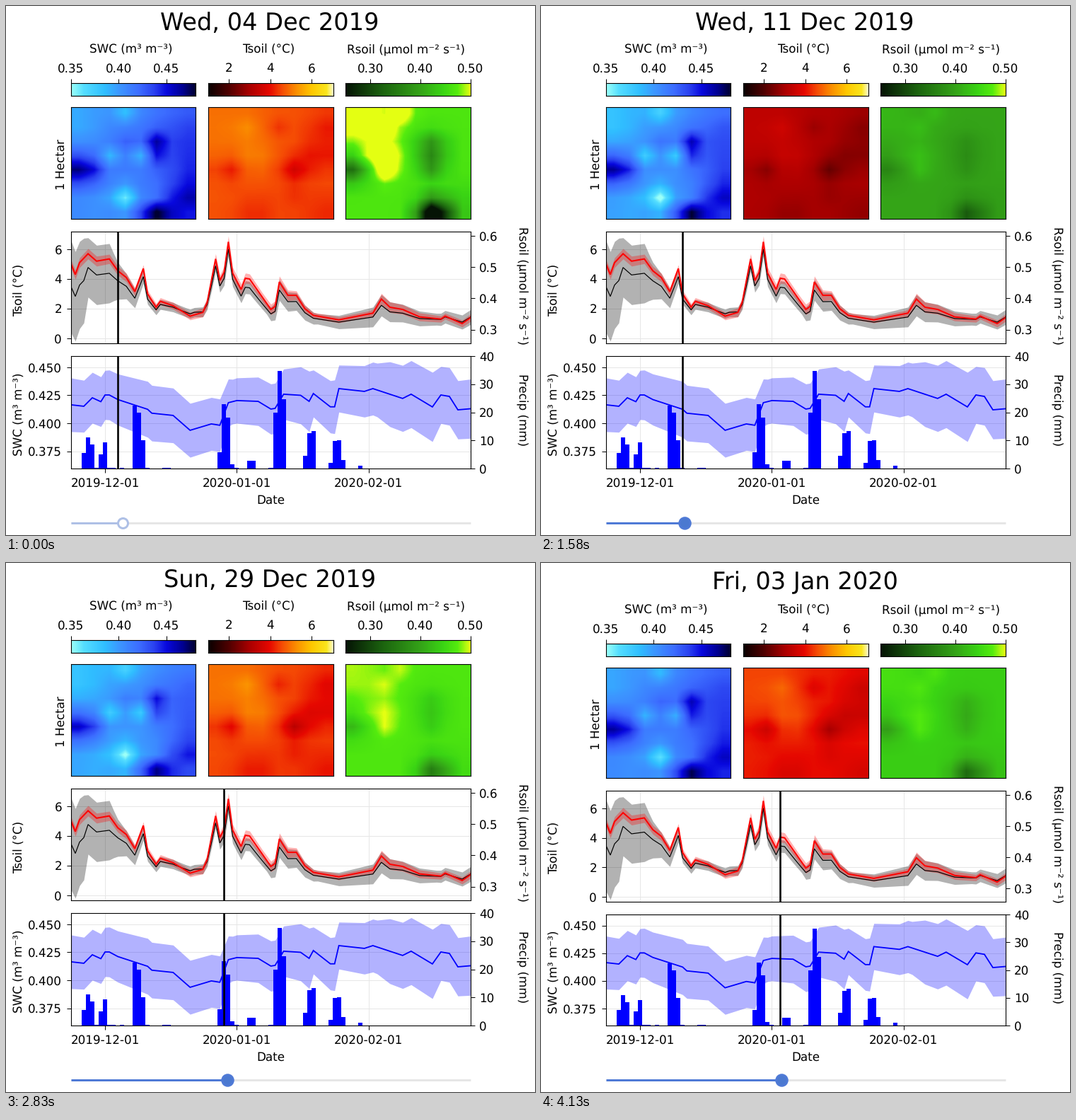
Animation, 748 px wide and 748 px high, one loop 4.18 s. Source, as a matplotlib script:

```python
import numpy as np
import matplotlib.pyplot as plt
from matplotlib.animation import FuncAnimation
from matplotlib.colors import LinearSegmentedColormap

SIZE = 748
PT = 0.72  # points per pixel at 100 dpi
FRAMES, STEP = 95, 44
DAYS = np.arange(95)  # day 0 is Sat, 23 Nov 2019
X0, X1 = 92, 657

plt.rcParams.update({
    "font.family": "DejaVu Sans", "font.size": 16.8 * PT,
    "text.hinting": "none", "axes.linewidth": 1.1 * PT,
})


# ---------------------------------------------------------------- time series
def curve(*points):
    """Daily values through a few (day, value) turning points."""
    return np.interp(DAYS, *zip(*points))


temp = curve((0, 5), (1, 4.3), (2, 5.1), (4, 5.7), (6, 5.2), (9, 5.35),
             (11, 4.55), (13, 4.1), (15, 3.15), (17, 4.7), (18, 3), (20, 2.1),
             (21, 2.5), (24, 2.2), (28, 1.5), (31, 1.75), (32, 2.4),
             (34, 5.35), (35, 3.9), (36, 4.45), (37, 6.5), (38, 4.4),
             (40, 3.3), (41, 4.05), (42, 4), (47, 1.95), (48, 2.15), (49, 3.8),
             (51, 2.9), (53, 2.9), (55, 2), (57, 1.55), (63, 1.25), (71, 1.7),
             (73, 2.65), (75, 2.1), (78, 1.95), (82, 1.45), (87, 1.3),
             (88, 1.5), (92, 1), (94, 1.4))
temp_sd = curve((0, .3), (4, .35), (18, .25), (26, .22), (37, .4), (45, .3),
                (49, .4), (57, .2), (70, .2), (73, .38), (88, .2), (94, .25))

# respiration follows temperature with a slow drift (on the temperature scale)
resp = .3 + .75 * temp + .02 * temp ** 2 + curve(
    (0, -1.08), (3, -1.04), (4, -.45), (9, -.5), (11, -.25), (25, .08),
    (29, .22), (33, 0), (38, 0), (41, -.22), (55, -.15), (73, -.2), (94, .05))
resp_sd = curve((0, 3.1), (3, 2.85), (4, 2), (9, 2), (10, 1.6), (11, 1.25),
                (13, .85), (18, .35), (27, .3), (33, .35), (37, .5), (46, .35),
                (49, .7), (53, .6), (58, .35), (63, .45), (73, .72),
                (86, .4), (94, .5))

water = curve((0, 416.5), (3, 415.2), (5, 422.8), (7, 419.3), (8, 425.3),
              (9, 425.3), (11, 421.2), (18, 412.5), (19, 409), (24, 407),
              (28, 393.7), (33, 399.4), (35, 398.2), (37, 418.4), (39, 420.3),
              (44, 419.6), (47, 412.7), (48, 413.3), (50, 426), (54, 425),
              (56, 419.6), (57, 426.6), (61, 414.7), (62, 414.7), (63, 431),
              (69, 428.5), (71, 431), (78, 422.2), (80, 426), (85, 414.6),
              (87, 425.3), (89, 424), (91, 412), (94, 413)) / 1000
water_sd = curve((0, 24), (8, 22), (18, 25), (35, 23.5), (38, 20), (47, 22.5),
                 (50, 22.5), (56, 27), (57, 21), (62, 24), (63, 21), (72, 24),
                 (75, 29), (85, 31), (87, 25.5), (94, 26.5)) / 1000

rain = np.zeros(len(DAYS))
rain[[6, 9, 10, 12, 18, 22, 23, 39, 47]] = .3
for start, storm in [(3, (5.5, 11, 8.5)), (7, (5, 9.2)), (15, (22.5, 20, 10)),
                     (35, (5.7, 22.8, 18, 1.4)), (42, (2.8, 2.8)),
                     (48, (20, 34.8, 24.6)), (55, (4.5, 12.5, 13.3)),
                     (61, (2, 9.8, 10, 3)), (68, (1,))]:
    rain[start:start + len(storm)] = storm

# ------------------------------------------------------ maps of 8 x 8 plots
ROW, COL = np.mgrid[:8, :8]


def pattern(*spots):
    """Sum of (row, col, amount, width) bumps, scaled to mean 0 and sd 1."""
    z = sum(a * np.exp(-((ROW - r) ** 2 + (COL - c) ** 2) / (2 * w * w))
            for r, c, a, w in spots)
    return (z - z.mean()) / z.std()


water_spots = pattern(
    (4, .3, 60, .7), (7, 5, 65, .7), (6.3, 7, 32, .9), (4, 8, 30, 1.8),
    (1, 7, 15, 1.2), (2, 5, 38, .5), (3, 5, 25, .5), (2, 3, 12, .7),
    (0, 3, -28, .6), (6, 3, -55, .6), (3, 2, -28, .5), (3, 4, -32, .5),
    (6, 5, -25, .5), (.5, 0, -22, 1.3), (6.5, .8, -12, 1))
temp_spots = pattern(
    (1, 2, 3, .6), (3, 2.5, 3, .8), (1, 0, 3, 2.5), (4, 5, -8, .6),
    (3, 6.5, -5, .8), (4, .8, -6, .6), (1, 4, -3, .5), (1, 7, -4, .8),
    (6, 5, -2, .6), (7, 7, -3, 1), (7, 2.5, -3, .9))
resp_spots = pattern(
    (.4, .3, 4, .9), (0, 3, 4, .5), (1, 2, 4, .5), (3, 1.8, 5, .8),
    (4, 2, 3, .5), (4, .2, -8, .6), (2.5, 5, -6, .7), (4, 5, -4, .6),
    (7, 5, -16, .6), (7, 6, -5, .6), (6, 7, -1, 1))

# right-axis value for a respiration given on the temperature scale
R_BASE, R_GAIN = .2724, .0474


def spectrum(name, *stops):
    return LinearSegmentedColormap.from_list(
        name, [(p, np.array(c) / 255) for p, c in stops], 256)


BLUES = spectrum("blues", (0, (155, 255, 248)), (.1, (85, 222, 255)),
                 (.27, (48, 190, 255)), (.39, (60, 150, 255)),
                 (.55, (60, 108, 255)), (.67, (42, 65, 240)),
                 (.77, (8, 8, 222)), (.9, (0, 0, 145)), (1, (0, 0, 50)))
REDS = spectrum("reds", (0, (10, 0, 0)), (.16, (78, 0, 0)),
                (.33, (170, 0, 0)), (.49, (230, 8, 0)), (.59, (245, 75, 5)),
                (.7, (250, 140, 0)), (.83, (255, 200, 0)),
                (.95, (250, 230, 30)), (1, (255, 252, 200)))
GREENS = spectrum("greens", (0, (5, 20, 5)), (.3, (28, 100, 15)),
                  (.6, (52, 163, 24)), (.78, (58, 212, 20)),
                  (.9, (85, 236, 14)), (1, (228, 255, 18)))

# ---------------------------------------------------------------------- layout
fig = plt.figure(figsize=(SIZE / 100, SIZE / 100), dpi=100, facecolor="white")
boxes, labels = [], []


def panel(x0, x1, dec, jan, **kw):
    """Axes given in pixels, with one (top, bottom) pair for each layout."""
    ax = fig.add_axes([0, 0, 1, 1], label=f"{x0}-{dec}", **kw)
    boxes.append((ax, x0, x1, (dec, jan)))
    return ax


def label(x, dec, jan, text, rotation=0, size=16.8):
    art = fig.text(x / SIZE, 1, text, rotation=rotation, ha="center",
                   va="baseline", rotation_mode="anchor", fontsize=size * PT)
    labels.append((art, (dec, jan)))
    return art


def ticks(ax, axis, places, fmt, pad):
    set_ticks = ax.set_xticks if axis == "x" else ax.set_yticks
    set_ticks(places, [fmt % p for p in places])
    ax.tick_params(axis=axis, length=6 * PT, width=PT, pad=pad * PT)


title = label(373, 34, 37, "", size=33.6)

maps = []
for x0, x1, text, cx, lo, hi, marks, fmt, colors, mean, sd, spots in [
        (92, 268, "SWC (m³ m⁻³)", 177, .35, .4804, (.35, .4, .45), "%.2f",
         BLUES, water, water_sd, water_spots),
        (286, 462.5, "Tsoil (°C)", 371.5, 1, 7.03, (2, 4, 6), "%d",
         REDS, temp, temp_sd, temp_spots),
        (480, 656.5, "Rsoil (μmol m⁻² s⁻¹)", 565.5, .25, .5, (.3, .4, .5),
         "%.2f", GREENS, R_BASE + R_GAIN * resp, R_GAIN * resp_sd,
         resp_spots)]:
    label(cx, 67, 72, text)
    bar = panel(x0, x1, (109, 127), (114, 132))
    bar.imshow(np.linspace(lo, hi, 256)[None], cmap=colors, aspect="auto",
               extent=(lo, hi, 0, 1))
    bar.set_yticks([])
    bar.xaxis.tick_top()
    ticks(bar, "x", marks, fmt, 6)
    heat = panel(x0, x1, (142.5, 301), (147.5, 304))
    heat.set(xticks=[], yticks=[])
    image = heat.imshow(spots, cmap=colors, vmin=lo, vmax=hi, aspect="auto",
                        interpolation="bilinear")
    maps.append((image, mean, sd, spots))

label(83, 224, 228, "1 Hectar", 90)
label(24, 402, 403, "Tsoil (°C)", 90)
label(24, 577, 578, "SWC (m³ m⁻³)", 90)
label(725, 396, 398, "Rsoil (μmol m⁻² s⁻¹)", -90)
label(725, 571, 572, "Precip (mm)", -90)
label(374, 704, 704, "Date")


def chart(dec, jan, ylim, marks, fmt, ylim2, marks2, fmt2):
    ax, right = panel(X0, X1, dec, jan), panel(X0, X1, dec, jan, frameon=False)
    for a, lim in (ax, ylim), (right, ylim2):
        a.set(xlim=(0, 94), ylim=lim, xticks=[])
    right.yaxis.tick_right()
    ticks(ax, "y", marks, fmt, 7)
    ticks(right, "y", marks2, fmt2, 6)
    ax.set_axisbelow(True)
    ax.grid(axis="y", color="0.9", lw=PT)
    for day in (8, 39, 70):
        ax.axvline(day, color="0.9", lw=PT, zorder=.5)
    return ax, right


def series(ax, mean, sd, color, width):
    ax.fill_between(DAYS, mean - sd, mean + sd, color=color, alpha=.3, lw=0)
    ax.plot(DAYS, mean, color=color, lw=width * PT, solid_joinstyle="miter")


top, top_right = chart((319, 477), (322, 479), (-.333, 7.19), (0, 2, 4, 6),
                       "%d", (.2566, .6133), (.3, .4, .5, .6), "%.1f")
low, low_right = chart((495, 654), (497, 654), (.3595, .4601),
                       (.375, .4, .425, .45), "%.3f", (0, 40),
                       (0, 10, 20, 30, 40), "%d")
series(top, resp, resp_sd, "black", 1.2)
series(top, temp, temp_sd, "red", 2)
series(low, water, water_sd, "blue", 1.8)
low_right.bar(DAYS, rain, width=1, color="blue", lw=0)
low.set_xticks([8, 39, 70], ["2019-12-01", "2020-01-01", "2020-02-01"])
low.tick_params(axis="x", length=6 * PT, width=PT, pad=7 * PT)
cursors = [a.axvline(0, color="black", lw=2.6 * PT, zorder=5)
           for a in (top, low_right)]

# ---------------------------------------------------------------------- slider
ACCENT, DIMMED = np.array([79, 122, 214]) / 255, np.array([174, 192, 230]) / 255
stage = fig.add_axes([0, 0, 1, 1], frameon=False)
stage.set(xlim=(0, SIZE), ylim=(SIZE, 0), xticks=[], yticks=[])
RAIL = 730.5
stage.plot([X0, X1], [RAIL, RAIL], color="0.9", lw=3 * PT,
           solid_capstyle="butt")
done, = stage.plot([], [], lw=3 * PT, solid_capstyle="butt")
knob, = stage.plot([], [], "o", mew=3 * PT)

DRAG_T = [0, 1090, 1170, 1580, 2130, 2830, 3300, 3540, 3630, 4100]
DRAG_X = [165, 165, 169, 205, 253, 312, 354, 367, 364, 340]
HOVER = 300


def date_text(day):
    name = ("Sat", "Sun", "Mon", "Tue", "Wed", "Thu", "Fri")[day % 7]
    if day < 39:
        return f"{name}, {day - 7:02d} Dec 2019"
    return f"{name}, {day - 38:02d} Jan 2020"


def place(layout):
    for ax, x0, x1, spans in boxes:
        y0, y1 = spans[layout]
        ax.set_position([x0 / SIZE, 1 - y1 / SIZE,
                         (x1 - x0) / SIZE, (y1 - y0) / SIZE])
    for art, ys in labels:
        art.set_y(1 - ys[layout] / SIZE)


def update(frame):
    t = (frame + .5) * STEP
    x = np.interp(t, DRAG_T, DRAG_X)
    day = int(round((x - 100.5) / 5.85))
    # the J of "Jan" reaches lower and makes the title row taller
    place(int(day >= 39))
    title.set_text(date_text(day))
    for image, mean, sd, spots in maps:
        image.set_data(mean[day] + sd[day] * spots)
    for line in cursors:
        line.set_xdata([day, day])

    active = t >= HOVER
    color = ACCENT if active else DIMMED
    done.set_data([X0, x], [RAIL, RAIL])
    done.set_color(color)
    knob.set_data([x], [RAIL])
    knob.set_markersize((15.5 if active else 14) * PT)
    knob.set_markeredgecolor(color)
    knob.set_markerfacecolor("#4b79d0" if active else "white")
    return []


update(0)
anim = FuncAnimation(fig, update, frames=FRAMES, interval=STEP,
                     repeat=True, repeat_delay=0, blit=False)
plt.show()
```
